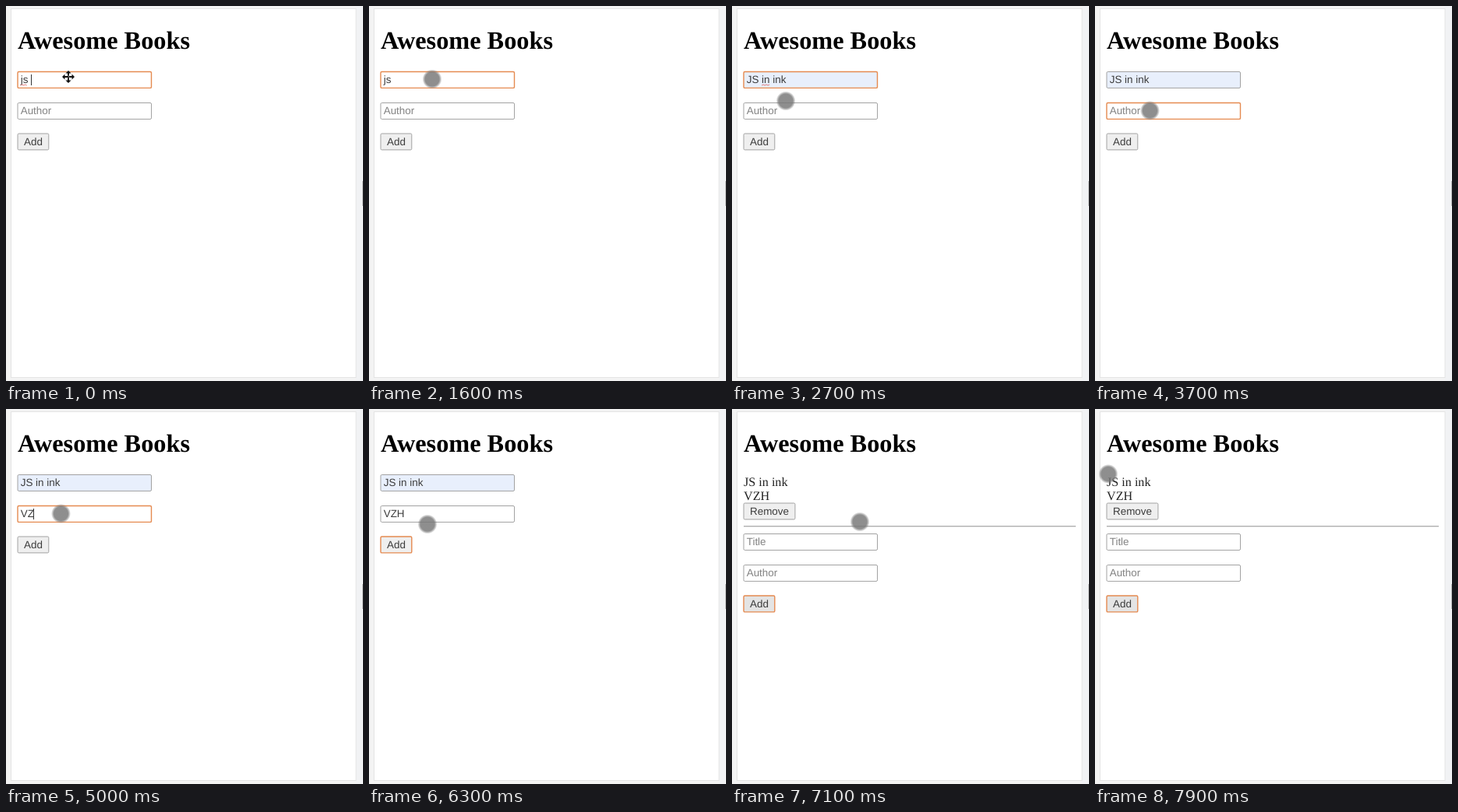
An HTML page that plays this animation: 458 by 482 pixels, repeating every 8 s.

```html
<!DOCTYPE html>
<html lang="en">
<head>
<meta charset="utf-8">
<title>Awesome Books</title>
<style>
  html, body { margin: 0; width: 100%; height: 100%; overflow: hidden; background: #f3f3f3; }
  svg { display: block; }
  text { white-space: pre; text-rendering: geometricPrecision; }
  .ui { font: 13.45px "Liberation Sans", Arial, sans-serif; }
  .page { font: 16.15px "Liberation Serif", "Times New Roman", serif; }
  .heading { font: bold 32.3px "Liberation Serif", "Times New Roman", serif; }
</style>
</head>
<body>
<svg width="458" height="482" viewBox="0 0 458 482">
  <defs>
    <radialGradient id="spot">
      <stop offset=".72" stop-color="#777" stop-opacity=".83"/>
      <stop offset=".84" stop-color="#777" stop-opacity=".5"/>
      <stop offset="1" stop-color="#777" stop-opacity="0"/>
    </radialGradient>
  </defs>
  <rect width="458" height="482" fill="#f3f3f3"/>
  <rect x="449" width="9" height="482" fill="#f1f2f4"/>
  <rect x="6.5" y="3.5" width="442.5" height="474" fill="#fff" stroke="#e4e4e4"/>
  <rect x="457" y="225" width="1" height="32" fill="#b4b4b4"/>
  <text class="heading" x="15" y="55.4">Awesome Books</text>
  <g id="scene"></g>
</svg>
<script>
const LOOP = 8000, STEP = 100;
const BOOK = { title: "JS in ink", author: "VZH" };
const ORANGE = "#e58a50", GREY = "#a2a2a2", INK = "#3c3c3c";
const scene = document.getElementById("scene");
const ruler = document.createElement("canvas").getContext("2d");
ruler.font = '13.45px "Liberation Sans", Arial, sans-serif';
const widthOf = text => ruler.measureText(text).width;

// Pointer path: time, x, y
const path = [
  [0, 80, 91], [500, 80, 91], [800, 81, 93], [1500, 81, 93], [1600, 81, 94],
  [2000, 76, 114], [2200, 71, 122], [2700, 69, 122], [3000, 70.5, 134.5],
  [6200, 70.5, 134.5], [6300, 75, 148], [6600, 47, 176], [6900, 47, 176],
  [7100, 164, 145], [7400, 164, 145], [7900, 17, 83.5]
];

// Moments at which the caret's blink restarts
const caretResets = [-200, 800, 3000, 4500, 4900, 5200];

function pointerAt(t) {
  const i = path.findIndex(key => key[0] >= t);
  if (i <= 0) return path[0].slice(1);
  const [t0, x0, y0] = path[i - 1], [t1, x1, y1] = path[i];
  const k = (t - t0) / (t1 - t0);
  return [x0 + (x1 - x0) * k, y0 + (y1 - y0) * k];
}

function caretVisible(t) {
  const start = caretResets.filter(r => r <= t).pop();
  return Math.floor((t - start) / 500) % 2 === 0;
}

function box(y, width, fill, focused) {
  return `<rect x="15" y="${y + .5}" width="${width - .5}" height="20.9" rx="1.5"
    fill="${fill}" stroke="${focused ? ORANGE : GREY}" stroke-width="${focused ? 1.4 : 1}"/>`;
}

function label(x, y, text, fill = INK, cls = "ui") {
  return `<text class="${cls}" x="${x}" y="${y}" fill="${fill}">${text}</text>`;
}

function squiggle(x, y, width) {
  let d = `M${x} ${y}`;
  for (let i = 1; i * 2 <= width; i++) d += `L${x + i * 2} ${y + (i % 2 ? -1 : 0)}`;
  return `<path d="${d}" fill="none" stroke="#d77" stroke-width="1"/>`;
}

function field(y, { value, hint, focused, caret, filled, misspelt }) {
  let out = box(y, 172, filled ? "#e8effc" : "#fff", focused);
  out += label(18.7, y + 15.3, value || hint, value ? INK : "#828282");
  if (misspelt) {
    const before = value.slice(0, value.indexOf(misspelt));
    out += squiggle(18.7 + widthOf(before), y + 18, widthOf(misspelt));
  }
  if (focused && caret)
    out += `<rect x="${Math.floor(18.7 + widthOf(value))}" y="${y + 4}" width="1" height="14" fill="#333"/>`;
  return out;
}

function button(y, text, focused, fill = "#efefef") {
  return box(y, widthOf(text) + 16.4, fill, focused) + label(23, y + 15.3, text);
}

function moveIcon(x, y) {
  const arm = '<path d="M-1 0V-4.5H-3.6L0-8 3.6-4.5H1V0z"/>';
  const arms = [0, 90, 180, 270].map(a => `<g transform="rotate(${a})">${arm}</g>`).join("");
  return `<g transform="translate(${x} ${y})" fill="#111" stroke="#fff" stroke-width=".5"
    paint-order="stroke">${arms}</g>`;
}

function draw(t) {
  const added = t >= 6900, autofilled = t >= 2000;
  const focus = t < 3000 ? "title" : t < 5900 ? "author" : "add";
  const caret = caretVisible(t);
  const title = added ? "" : autofilled ? BOOK.title : t < 800 ? "js " : "js";
  const letters = added ? 0 : [4500, 4900, 5200].filter(at => t >= at).length;
  const misspelt = t < 800 ? "js" : autofilled && t < 3000 ? "in" : "";
  const top = added ? 160 : 84;
  const [x, y] = pointerAt(t);
  let out = "";

  if (added) {
    out += label(15, 98.5, BOOK.title, "#222", "page") + label(15, 116.5, BOOK.author, "#222", "page");
    out += button(120.5, "Remove");
    out += '<rect x="15" y="150" width="426" height="1" fill="#b0b0b0"/>';
    out += '<rect x="15" y="151" width="426" height="1" fill="#dedede"/>';
  }
  out += field(top, {
    value: title, hint: "Title", focused: focus === "title",
    caret: caret && !autofilled, filled: autofilled && !added, misspelt
  });
  out += field(top + 40, {
    value: BOOK.author.slice(0, letters), hint: "Author", focused: focus === "author", caret
  });
  out += button(top + 79.5, "Add", focus === "add", t >= 6600 ? "#e4e4e4" : "#efefef");
  out += t < 200 ? moveIcon(x, y) : `<circle cx="${x}" cy="${y}" r="12.5" fill="url(#spot)"/>`;
  scene.innerHTML = out;
}

let shown = -1;
function tick() {
  const t = Math.floor(performance.now() % LOOP / STEP) * STEP;
  if (t !== shown) draw(shown = t);
  requestAnimationFrame(tick);
}
tick();
</script>
</body>
</html>
```
